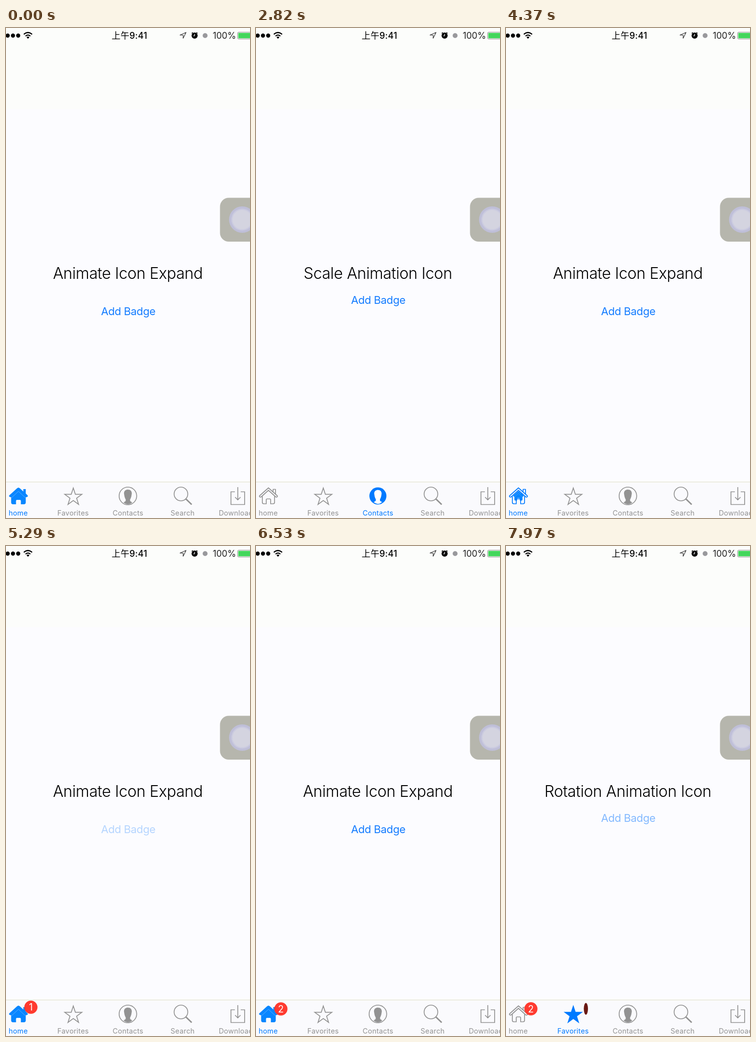
An HTML page that plays this animation: 500 by 1000 pixels, repeating every 7.99 s.

```html
<!DOCTYPE html>
<html lang="en">
<head>
<meta charset="utf-8">
<title>Tab bar animations</title>
<style>
  html, body { margin: 0; width: 100%; height: 100%; overflow: hidden; background: #fcfcff; }
  svg { display: block; width: 100vw; height: 100vh; }
  text { font-family: Inter, "Noto Sans CJK SC", "Noto Sans CJK", sans-serif; text-anchor: middle; }
  .tab { color: #929292; }
  .tab.on { color: #007aff; }
  .tab text { font-size: 14.5px; letter-spacing: .2px; fill: currentColor; }
  .line { fill: none; stroke: currentColor; stroke-width: 1.7; }
  .solid { fill: currentColor; }
  .tab .full, .tab.on .line.empty { display: none; }
  .tab.on .full { display: inline; }
</style>
</head>
<body>
<svg viewBox="0 0 500 1000" preserveAspectRatio="none">
  <defs>
    <path id="bust" d="M-8 -5C-8 -11 -4 -13 0 -13S8 -11 8 -5L7 1Q6 5 4.5 7V10Q6 12 9 13Q5 17 0 17T-9 13Q-6 12 -4.5 10V7Q-6 5 -7 1Z"/>
    <path id="house" d="M0 -17Q1.5 -17 3 -15.5L10 -9V-14H15V-5L19 -1Q20 2 16 2.5H15V13Q15 17 11 17H5V10Q5 8 3 8H-3Q-5 8 -5 10V17H-11Q-15 17 -15 13V2.5H-16Q-20 2 -19 -1L-3 -15.5Q-1.5 -17 0 -17Z"/>
  </defs>
  <rect width="500" height="1000" fill="#fcfcff"/>
  <rect width="500" height="166" fill="#fcfdfb"/>
  <rect y="927" width="500" height="73" fill="#fafafd"/>

  <g id="status">
    <circle cx="3.5" cy="15.5" r="4.2"/><circle cx="14.3" cy="15.5" r="4.2"/><circle cx="25" cy="15.5" r="4.2"/>
    <path d="M36.5 13Q45 5.5 53.5 13M40 16.5Q45 12.3 50 16.5" fill="none" stroke="#000" stroke-width="2.2"/>
    <path d="M42 18.7Q45 16.3 48 18.7L45 22Z"/>
    <text x="253" y="21.500" font-size="18" font-weight="500" letter-spacing=".2">上午9:41</text>
    <path d="M369 9L356.5 14.5H363V21Z" fill="none" stroke="#333" stroke-width="1.2" stroke-linejoin="round"/>
    <circle cx="386.5" cy="15.5" r="6.2"/>
    <path d="M380.5 11L383 9M390 9L392.500 11" stroke="#000" stroke-width="1.6"/>
    <path d="M386.5 12V16H383.5" fill="none" stroke="#fff" stroke-width="1.2"/>
    <circle cx="408" cy="15.5" r="5" fill="#99999c"/>
    <text x="447.5" y="21.8" font-size="18" fill="#222">100%</text>
    <rect x="474.5" y="8.5" width="40" height="14" rx="2.5" fill="#fff" stroke="#888"/>
    <rect x="476" y="10" width="38" height="11" rx="1" fill="#43d65c"/>
  </g>

  <rect x="438.5" y="346.5" width="90" height="89.5" rx="18" fill="#b6b6ad"/>
  <circle cx="484" cy="391" r="27" fill="#bfbfd8"/>
  <circle cx="484" cy="391" r="22.5" fill="#cacae0"/>
  <circle cx="484" cy="391" r="20" fill="#d4d4e0"/>

  <text id="title" x="249.700" y="512" font-size="32" font-weight="350" letter-spacing="-.4"></text>
  <text id="button" x="250.5" font-size="22" letter-spacing="-.35" fill="#147cff">Add Badge</text>

  <path d="M0 926.5H500" stroke="#dfdfc4"/>

  <g class="tab" id="home">
    <g transform="translate(25.5 955)">
      <g id="homeFill" class="full">
        <use href="#house" fill="#0886ff"/>
        <path d="M-14 3.5L0 -9.5L14 3.5" fill="none" stroke="#5bafff"/>
      </g>
      <g id="homeOutline" class="line" stroke-linejoin="round">
        <path d="M-12.5 1V13Q-12.5 16 -9.5 16H-4.5V8Q-4.5 6 -2.5 6H2.5Q4.5 6 4.5 8V16H9.5Q12.5 16 12.5 13V1M9.5 -8.5V-13.5H14.5V-4"/>
        <path d="M0 -16.5L18 -.5Q19 1 17.5 2Q16 3 15 2L0 -11.5L-15 2Q-16 3 -17.5 2Q-19 1 -18 -.5Z" fill="#fafafd"/>
      </g>
    </g>
    <text x="25" y="995">home</text>
  </g>

  <g class="tab" id="favorites">
    <g transform="translate(137.9 957.3)">
      <path id="starLine" class="line empty"/>
      <path id="star" class="solid full"/>
    </g>
    <text x="137.5" y="995">Favorites</text>
  </g>

  <g class="tab" id="contacts">
    <g transform="translate(249.8 955)">
      <g id="person">
        <circle class="line empty" r="18"/>
        <use class="solid" href="#bust"/>
        <g class="full">
          <circle class="solid" r="17.5"/>
          <use href="#bust" fill="#fff" transform="scale(.95)"/>
        </g>
      </g>
    </g>
    <text x="250" y="995">Contacts</text>
  </g>

  <g class="tab">
    <circle class="line" cx="358.5" cy="951" r="14"/>
    <path class="line" d="M368.5 961L380.5 972.5" style="stroke-width:3"/>
    <text x="362" y="995">Search</text>
  </g>

  <g class="tab">
    <path class="line" d="M469 946.5H461V972.5H489V946.5H481M475 937V962.5M469.5 957.5L475 963L480.5 957.5"/>
    <text x="475" y="995">Downloads</text>
  </g>

  <g id="homeBadge">
    <circle r="13.5" fill="#ff3b30"/>
    <text id="count" y="7" font-size="19.5" fill="#fff"></text>
  </g>
  <ellipse id="flipBadge" cx="163.7" cy="944.5" ry="12"/>
</svg>
<script>
const LOOP = 7990;
const PAGES = {
  home: { title: 'Animate Icon Expand', buttonY: 586 },
  favorites: { title: 'Rotation Animation Icon', buttonY: 562.5 },
  contacts: { title: 'Scale Animation Icon', buttonY: 563 }
};
const TAPS = [[0, 'home'], [1700, 'favorites'], [2520, 'contacts'], [4205, 'home'], [7200, 'favorites']];
const RELEASES = [5255, 6050, 7860];
const PRESS = 100, FADE = 280, FLIP = 285, EXPAND = 300, SPIN = 650;

const $ = id => document.getElementById(id);
const clamp = v => Math.min(1, Math.max(0, v));
const show = (el, on) => el.style.display = on ? '' : 'none';

function starPath(outer) {
  const points = Array.from({ length: 10 }, (_, i) => {
    const r = i % 2 ? outer * 0.385 : outer, a = i * Math.PI / 5;
    return `${(r * Math.sin(a)).toFixed(2)} ${(-r * Math.cos(a)).toFixed(2)}`;
  });
  return `M${points.join('L')}Z`;
}
$('starLine').setAttribute('d', starPath(18.5));
$('star').setAttribute('d', starPath(20.8));

function buttonAlpha(t) {
  const release = RELEASES.find(r => t >= r - PRESS && t < r + FADE);
  return release === undefined ? 1 : 0.2 + 0.8 * clamp((t - release) / FADE);
}

function drawBadges(t) {
  const count = RELEASES.slice(0, 2).filter(r => t >= r).length;
  show($('homeBadge'), count > 0);
  if (count) {
    const s = (t - RELEASES[count - 1]) / 1000;
    const dy = -5 * Math.exp(-5 * s) * Math.sin(8 * Math.PI * s);
    $('homeBadge').setAttribute('transform', `translate(51 ${944.5 + dy})`);
    $('count').textContent = count;
  }
  const turn = (t - RELEASES[2]) / FLIP;
  show($('flipBadge'), turn >= 0);
  if (turn >= 0) {
    const angle = Math.PI * clamp(turn), light = 1 - 0.62 * Math.sin(angle);
    $('flipBadge').setAttribute('rx', 12.5 * Math.abs(Math.cos(angle)));
    $('flipBadge').setAttribute('fill', `rgb(${255 * light},${59 * light},${48 * light})`);
  }
}

function draw(t) {
  const [start, page] = TAPS.filter(tap => tap[0] <= t).pop();
  const age = t - start, s = age / 1000;
  for (const id in PAGES) $(id).classList.toggle('on', id === page);
  $('title').textContent = PAGES[page].title;
  $('button').setAttribute('y', PAGES[page].buttonY);
  $('button').setAttribute('opacity', buttonAlpha(t));

  const grow = start ? clamp(age / EXPAND) : 1;
  $('homeFill').setAttribute('transform', `scale(${grow})`);
  show($('homeOutline'), page !== 'home' || grow < 1);

  const spin = clamp(age / SPIN), eased = spin * spin * (3 - 2 * spin);
  $('star').setAttribute('transform', `rotate(${360 * eased})`);

  const pop = page === 'contacts' ? 1 - 0.5 * Math.exp(-8 * s) * Math.cos(5 * Math.PI * s) : 1;
  $('person').setAttribute('transform', `scale(${pop})`);
  drawBadges(t);
}

const origin = performance.now();
function tick() {
  draw((performance.now() - origin) % LOOP);
  requestAnimationFrame(tick);
}
tick();
</script>
</body>
</html>
```
